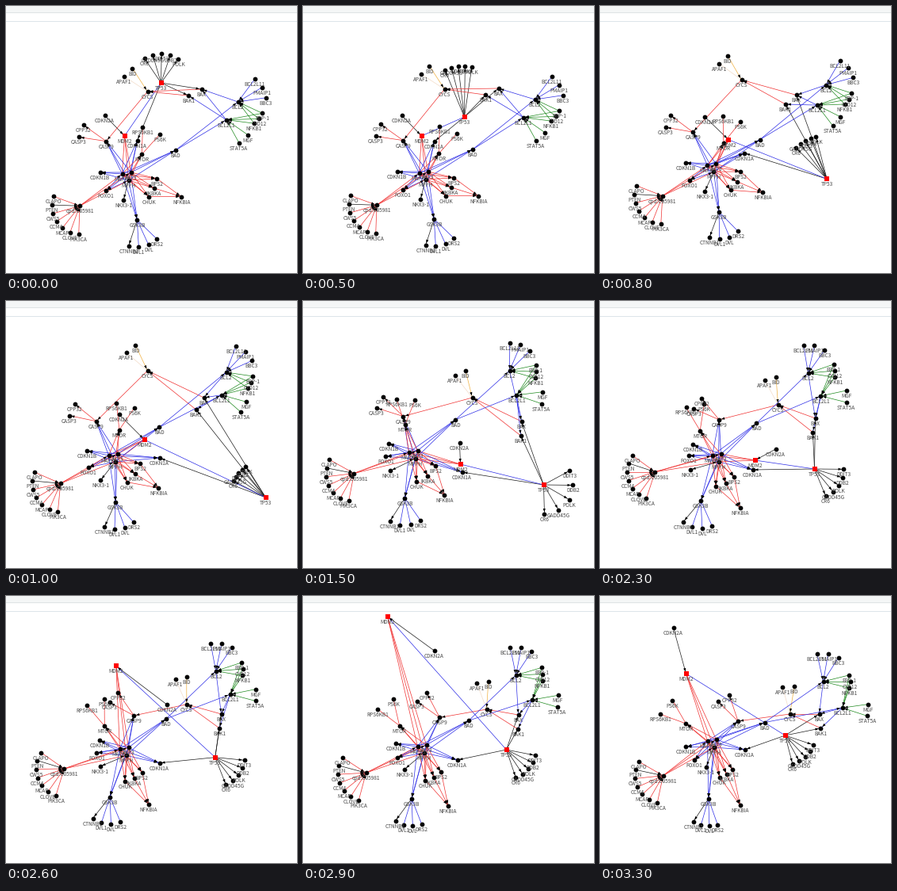
These frames come from a looping animation (367 by 337 pixels, 3400 ms). A matplotlib script:

```python
import matplotlib.pyplot as plt
import numpy as np
from matplotlib.animation import FuncAnimation
from matplotlib.collections import LineCollection, PolyCollection
from matplotlib.patches import Rectangle

W, H, DPI = 367, 337, 64
PX = 72 / DPI
STEPS, STEP_MS = 34, 100
HUB_KEYS = (2, 5, 10, 15, 23, 29, 33)
FAN_KEYS = (5, 15, 23, 33)
RED, BLUE, BLACK, GREEN = "#f03030", "#2c2ce6", "#1a1a1a", "#1f8a1f"
ORANGE, PALE = "#f0b040", "#f3dcc8"


def glide(keys, points):
    """Monotone cubic path through the points, one position per step."""
    k, p = np.array(keys, float), np.array(points, float)
    p = p.reshape(len(k), -1)
    h = np.diff(k)[:, None]
    d = np.diff(p, axis=0) / h
    m = np.zeros_like(p)
    total = np.where(d[:-1] * d[1:] > 0, d[:-1] + d[1:], np.inf)
    m[1:-1] = 2 * d[:-1] * d[1:] / total
    m[-1] = d[-1]
    t = np.clip(np.arange(STEPS), k[0], k[-1])
    i = np.clip(np.searchsorted(k, t, side="right") - 1, 0, len(k) - 2)
    s, hh = ((t - k[i]) / h[i, 0])[:, None], h[i]
    return (p[i] * (1 + 2 * s) * (1 - s) ** 2 + m[i] * hh * s * (1 - s) ** 2
            + p[i + 1] * s * s * (3 - 2 * s) + m[i + 1] * hh * s * s * (s - 1))


tracks = {}
edges = []


def hub(name, *points, keys=HUB_KEYS):
    tracks[name] = glide(keys, points)


def fan(names, center, radius, angle, spread=0, keys=FAN_KEYS):
    """Spread nodes evenly on an arc that swings around its center."""
    names = names.split()
    r, mid, width = (glide(keys, np.broadcast_to(v, len(keys)))
                     for v in (radius, angle, spread))
    for i, name in enumerate(names):
        share = i / (len(names) - 1) - 0.5 if len(names) > 1 else 0
        a = np.radians(mid + share * width)
        tracks[name] = tracks[center] + r * np.hstack([np.cos(a), np.sin(a)])


def link(sources, targets, color, arrow=True):
    for a in sources.split():
        for b in targets.split():
            edges.append((a, b, color, arrow))


# Nodes with their own path
hub("TP53", (196, 97), (204, 140), (328, 248), (304, 232), (271, 212), (257, 194), (234, 176))
hub("MDM2", (150, 164), (175, 175), (199, 206), (196, 201), (108, 27), (106, 25), (109, 98),
    keys=(5, 10, 15, 23, 28, 32, 33))
hub("CDKN2A", (125, 138), (143, 143), (198, 179), (222, 187), (166, 69), (103, 42), (93, 40),
    keys=(5, 10, 15, 23, 29, 32, 33))
hub("CDKN1A", (166, 170), (166, 171), (194, 198), (201, 216), (193, 213), (195, 207), (183, 194))
hub("CYCS", (179, 108), (179, 105), (179, 88), (214, 122), (225, 131), (232, 143), (240, 149))
hub("BAX", (247, 105), (247, 104), (250, 122), (276, 152), (272, 148), (272, 150), (277, 149))
hub("BCL2", (293, 121), (293, 118), (278, 90), (261, 88), (263, 91), (269, 100), (282, 108))
hub("MAPK2", (147, 212), (147, 211), (130, 195), (134, 191), (142, 195), (145, 190), (136, 183))
tracks["AKT3"] = tracks["MAPK2"] + (11, -2)
tracks["MPPH"] = tracks["MAPK2"] + (8, 8)

# Nodes that circle the core
fan("CDKN1B", "MAPK2", 28, (184, 204, 210, 165))
fan("FOXO1", "MAPK2", 29.5, (134, 170, 180, 124))
fan("NKX3-1", "MAPK2", 33, (87, 135, 147, 93))
fan("BPS2 IKBKA CHUK", "MAPK2", (44, 38, 39, 48), (24, 51, 64, 60), (33, 48, 39, 23))
fan("NFKBIA", "MAPK2", (80, 70, 75, 91), (21, 50, 62, 63))
fan("GSK3B", "MAPK2", (61, 58, 59, 73), (72, 95, 104, 89))
fan("cpd:C05981", "MAPK2", (67, 74, 75, 71), (143, 159, 164, 142))
fan("MTOR", "MAPK2", 35, (-45, -98, -116, -141))
fan("CASP9", "MAPK2", 46, (-116, -99, -79, -33))
fan("BAD", "MAPK2", (74, 72, 69, 76), (-24, -35, -36, -18))
fan("BAK1", "BAX", 18, (153, 93, 100, 84))
fan("BCL2L1", "BCL2", (27, 32, 33, 41), (123, 74, 61, 54))

# Outer leaves
fan("CLAPO PTEN CWS5 CCM4 MCAP CLOVE PIK3CA", "cpd:C05981", 35.5, (146, 155, 162, 156), -108)
fan("CTNNB1 DVL1 DVL DRS2", "GSK3B", 34.5, (76, 89, 98, 97), (-64, -68, -64, -53))
fan("BCL2L11 PMAIP1 BBC3", "BCL2", 35.5, (-31, -67, -77, -80), 45)
fan("EBP-1 CYD12 NFKB1", "BCL2", 34, (39, 2, -5, 0), 28)
fan("MGF STAT5A", "BCL2L1", 33, (48, 6, 1, 5), 26)
fan("APAF1 BID", "CYCS", 35, (-135, -116, -106, -93), 24)
fan("CASP3 CPP32", "CASP9", 35, (-158, -149, -143, -122), 27)
fan("RPS6KB1 PS6K", "MTOR", 34, (-68, -88, -101, -140), 40)

# These leaves trail behind the drag, then are flung to the other side
LEAVES = "CR6 GADD45G DDIT3 DDB2 POLK"
fan(LEAVES, "TP53", (37, 64, 46), (-89, -97, -138), (70, 31, 30), keys=(2, 5, 10))
trailing = {n: tracks[n] for n in LEAVES.split()}
fan("CR6 GADD45G POLK DDB2 DDIT3", "TP53", 37, (30, 34, 47), (-117, -67, -57), keys=(15, 23, 33))
fling = glide((10, 15), (0, 1))
for name, path in trailing.items():
    tracks[name] = path + fling * (tracks[name] - path)

CORE = "MAPK2 AKT3 MPPH"
link("TP53", LEAVES + " BAX BAK1 CDKN1A", BLACK)
link("MDM2", "TP53", BLUE, False)
link("CDKN2A", "MDM2", BLACK)
link(CORE, "MDM2", RED, False)
link("BID", "CYCS", ORANGE)
link("APAF1", "CYCS", PALE, False)
link("BAX BAK1", "CYCS", RED)
link("CYCS", "CASP9", RED)
link("CASP9", "CPP32 CASP3", RED)
link("BCL2", "BAX", BLUE)
link("BCL2L1", "BAX BAK1", BLUE)
link("BAD", "BCL2 BCL2L1", BLUE)
link("BCL2L11 PMAIP1 BBC3", "BCL2", BLUE)
link("EBP-1 CYD12 NFKB1", "BCL2 BCL2L1", GREEN)
link("MGF STAT5A", "BCL2L1", GREEN)
link(CORE, "BAD CASP9 CDKN1A CDKN1B FOXO1 GSK3B", BLUE)
link(CORE, "MTOR CHUK IKBKA BPS2", RED)
link("MTOR", "RPS6KB1 PS6K", RED, False)
link("MPPH", "NKX3-1", BLACK)
link("CHUK IKBKA BPS2", "NFKBIA", RED)
link("cpd:C05981", CORE, RED)
link("CLAPO CWS5 CCM4 MCAP CLOVE PIK3CA", "cpd:C05981", RED)
link("PTEN", "cpd:C05981", BLACK)
link("GSK3B", "CTNNB1", BLACK)
link("DVL1 DVL DRS2", "GSK3B", BLUE, False)

names = list(tracks)
index = {n: i for i, n in enumerate(names)}
paths = np.stack([tracks[n] for n in names], axis=1) - (0.5, 0)
start = np.array([index[e[0]] for e in edges])
end = np.array([index[e[1]] for e in edges])
arrowed = np.array([e[3] for e in edges])
special = np.isin(names, ["TP53", "MDM2"])

fig = plt.figure(figsize=(W / DPI, H / DPI), dpi=DPI, facecolor="white")
ax = fig.add_axes([0, 0, 1, 1])
ax.set(xlim=(0, W), ylim=(H, 0))
ax.axis("off")

for y, h, color in ((0, 8, "#f4f6f6"), (8, 1, "#dfe3e4"), (19, 1, "#dde5ea")):
    ax.add_patch(Rectangle((0, y), W, h, color=color, lw=0))

lines = LineCollection([], colors=[e[2] for e in edges], linewidths=0.7 * PX, zorder=2)
heads = PolyCollection([], facecolors="black", edgecolors="none", zorder=3)
ax.add_collection(lines, autolim=False)
ax.add_collection(heads, autolim=False)
dots, = ax.plot([], [], "o", color="black", ms=5.8 * PX, mew=0, zorder=4, snap=False)
squares, = ax.plot([], [], "s", color="#ff0000", ms=6 * PX, mew=0, zorder=5, snap=False)
labels = [ax.text(0, 0, n, family="Noto Sans CJK JP", size=6.5 * PX, color="#484848",
                  ha="center", va="baseline", zorder=6) for n in names]


def draw(step):
    pos = paths[step]
    a, b = pos[start], pos[end]
    lines.set_segments(np.stack([a, b], axis=1))
    u = (b - a) / np.maximum(np.hypot(*(b - a).T), 1e-6)[:, None]
    side = u[:, ::-1] * (-1, 1)
    tip, base = b - 2.5 * u, b - 7 * u
    heads.set_verts(np.stack([tip, base + 1.6 * side, base - 1.6 * side], axis=1)[arrowed])
    dots.set_data(*pos[~special].T)
    squares.set_data(*pos[special].T)
    for label, (x, y) in zip(labels, pos):
        label.set_position((x, y + 9))
    return [lines, heads, dots, squares, *labels]


anim = FuncAnimation(fig, draw, frames=STEPS, interval=STEP_MS, repeat=True,
                     repeat_delay=0, blit=False)
plt.show()
```
